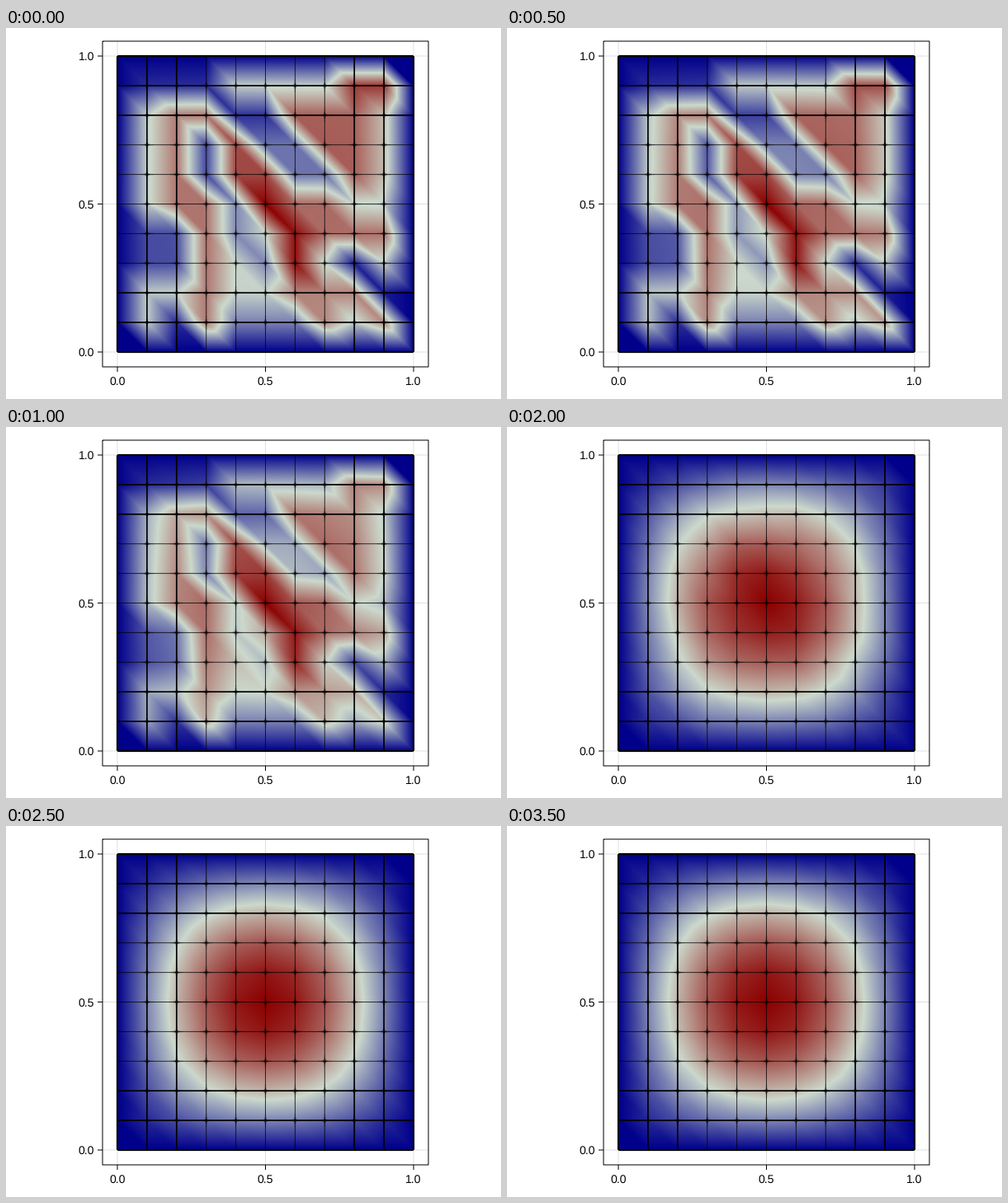
Recreate the animation shown at these times as a matplotlib script. Size 600 by 450 pixels, loop 4500 ms.

```python
import numpy as np
import matplotlib.pyplot as plt
from matplotlib.animation import FuncAnimation
from matplotlib.colors import LinearSegmentedColormap

plt.rcParams["text.hinting"] = "none"
plt.rcParams["text.hinting_factor"] = 1

W, H, DPI = 600, 450, 100
PX = 72 / DPI                      # one pixel in points
LEFT, TOP, SIDE, N = 135, 34, 359, 10
FRAMES, INTERVAL = 9, 500
CMAP = LinearSegmentedColormap.from_list(
    "bluesreds", ["#00008b", (0.8, 0.85, 0.8), "#8b0000"], N=512)

# Warm and cold ridges of the rough start, painted along mesh nodes
RIDGES = [
    (0.10, [(1, 9), (3, 9), (4, 8), (5, 8)]),
    (0.25, [(5, 7), (6, 7), (6, 6), (7, 6)]),
    (0.15, [(3, 7), (3, 6)]),
    (0.30, [(4, 5), (4, 4), (5, 3)]),
    (0.17, [(1, 3), (1, 4), (2, 4), (2, 3)]),
    (0.06, [(8, 3), (9, 2)]),
    (0.10, [(2, 1), (2, 1)]),
    (0.30, [(4, 1), (6, 1)]),
    (0.73, [(3, 1), (3, 5), (2, 5), (2, 8), (3, 8)]),
    (0.83, [(4, 7), (4, 6), (5, 6)]),
    (0.75, [(6, 5), (7, 5), (7, 4), (9, 4)]),
    (0.79, [(6, 8), (8, 8), (8, 6), (7, 7)]),
    (0.90, [(8, 9), (9, 9)]),
    (0.58, [(9, 8), (9, 6)]),
    (0.70, [(7, 1), (6, 2), (8, 2), (9, 1)]),
    (0.97, [(6, 3), (5, 5)]),
]


def rough_start():
    u = np.zeros((N + 1, N + 1))
    u[1:N, 1:N] = 0.48
    for level, path in RIDGES:
        for (x0, y0), (x1, y1) in zip(path, path[1:]):
            steps = max(abs(x1 - x0), abs(y1 - y0), 1)
            s = np.arange(steps + 1) / steps
            u[np.rint(y0 + (y1 - y0) * s).astype(int),
              np.rint(x0 + (x1 - x0) * s).astype(int)] = level
    u[N // 2, N // 2] = 1
    return u


ROUGH = rough_start()
ARCH = np.sin(np.pi * np.arange(N + 1) / N)
SMOOTH = np.outer(ARCH, ARCH)

# Pixel centres inside the mesh cells
pos = (np.arange(SIDE) + 0.5) / SIDE * N
cell = np.floor(pos).astype(int)
A, B = np.meshgrid(pos - cell, pos - cell)
COL, ROW = np.meshgrid(cell, cell)


def field(i):
    """Rough start relaxing to the smooth mode, at log-spaced times."""
    rest = np.exp(-10 ** (-1.5 + i / 2))
    u = rest * ROUGH + (1 - rest) * SMOOTH
    u /= u.max()
    sw, se = u[ROW, COL], u[ROW, COL + 1]
    nw, ne = u[ROW + 1, COL], u[ROW + 1, COL + 1]
    lower = sw + (se - sw) * A + (nw - sw) * B
    upper = ne + (nw - ne) * (1 - A) + (se - ne) * (1 - B)
    return np.where(A + B <= 1, lower, upper)


fig = plt.figure(figsize=(W / DPI, H / DPI), dpi=DPI, facecolor="white")
ax = fig.add_axes([0, 0, 1, 1])
ax.axis("off")


def line(x, y, width, alpha=1.0, z=3, cap="butt"):
    ax.plot(x, y, color="black", lw=width * PX, alpha=alpha, zorder=z,
            solid_capstyle=cap, snap=False)


def both(at, lo, hi, **style):
    """Same stroke as a vertical and as a horizontal."""
    line([LEFT + at] * 2, [TOP + lo, TOP + hi], **style)
    line([LEFT + lo, LEFT + hi], [TOP + at] * 2, **style)


image = ax.imshow(field(0), cmap=CMAP, vmin=0, vmax=1, origin="lower",
                  extent=(LEFT, LEFT + SIDE, TOP + SIDE, TOP),
                  interpolation="nearest", aspect="auto", zorder=2)
ax.set_xlim(0, W)
ax.set_ylim(H, 0)

# Mesh edges, darker towards the nodes
for n in range(N + 1):
    at = n * SIDE / N
    if n in (0, N):
        both(at, 1, SIDE - 1, width=2.2, cap="round")
    elif n in (1, 2, 8, 9):
        both(at, 0, SIDE, width=1.7)
    else:
        both(at, 0, SIDE, width=1, alpha=0.75)
    if 0 < n < N:
        for m in range(1, N):
            node = m * SIDE / N
            for reach, width, alpha in ((8, 1.5, 0.2), (4, 2.2, 0.25), (2, 3, 0.25)):
                both(at, node - reach, node + reach, width=width, alpha=alpha)

# Frame, faint grid, ticks and labels
X0, X1, Y0, Y1 = 117, 512, 16, 411
line([X0, X1, X1, X0, X0], [Y0, Y0, Y1, Y1, Y0], 1, z=4)
for n, label in enumerate(("0.0", "0.5", "1.0")):
    x, y = LEFT + n * SIDE / 2, TOP + SIDE - n * SIDE / 2
    line([x, x], [Y0, Y1], 1, 0.12, z=1)
    line([X0, X1], [y, y], 1, 0.12, z=1)
    line([x, x], [Y1, Y1 + 6], 1)
    line([X0 - 6, X0], [y, y], 1)
    font = dict(family="Liberation Sans", size=14 * PX, color="black")
    ax.text(x, 432.5, label, ha="center", va="baseline", **font)
    ax.text(107, y + 5, label, ha="right", va="baseline", **font)


def update(i):
    image.set_data(field(i))
    return [image]


anim = FuncAnimation(fig, update, frames=FRAMES, interval=INTERVAL,
                     repeat=True, repeat_delay=0, blit=False)
plt.show()
```
